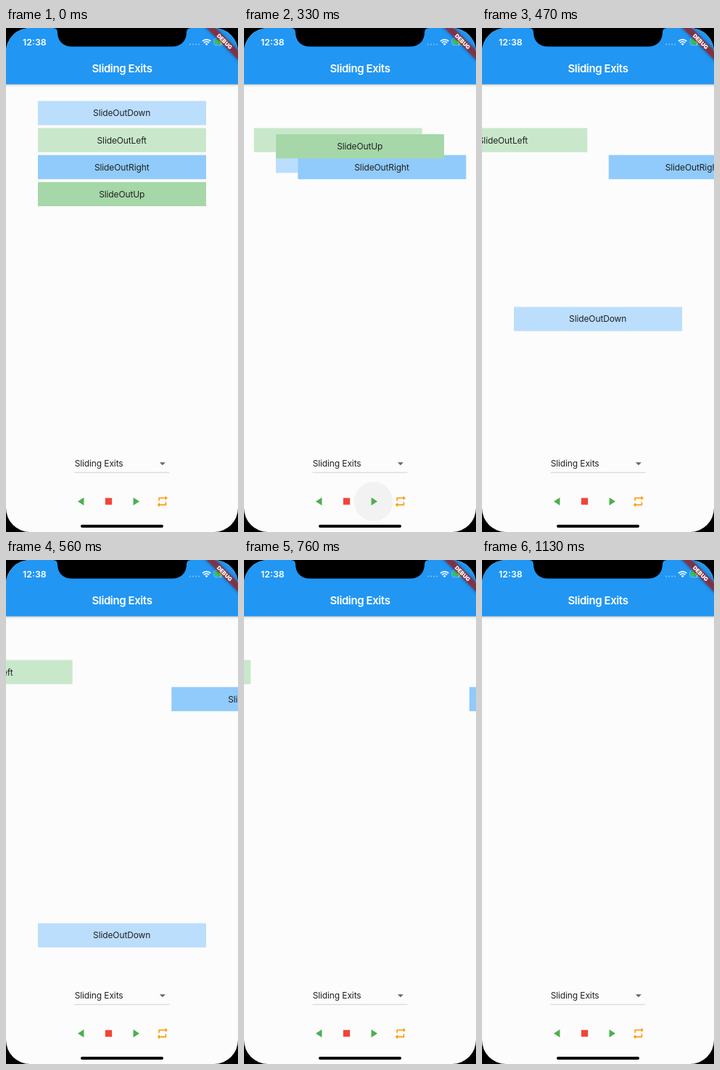
Recreate the animation shown at these times as an HTML page. Size 320 px wide and 693 px high, loop 1.18 s.

```html
<!DOCTYPE html>
<html lang="en">
<head>
<meta charset="utf-8">
<title>Sliding Exits</title>
<style>
  html, body { margin: 0; width: 100%; height: 100%; overflow: hidden; background: #000; }
  svg { display: block; width: 320px; height: 693px; }
  text { font: 12px Inter, Roboto, sans-serif; letter-spacing: -.12px; fill: #212121; }
  .title { font-size: 15px; font-weight: 600; letter-spacing: -.4px; fill: #fff; }
  .clock { font-size: 12.4px; font-weight: 600; letter-spacing: 0; fill: #fff; }
  .debug { font-size: 7.6px; font-weight: 900; letter-spacing: 0; fill: #fff; }
  .mid { text-anchor: middle; }
</style>
</head>
<body>
<svg viewBox="0 0 320 693">
  <defs>
    <clipPath id="screen"><rect width="320" height="693" rx="33"/></clipPath>
    <clipPath id="body"><rect y="77" width="320" height="503"/></clipPath>
    <linearGradient id="shade" x2="0" y2="1">
      <stop stop-opacity=".22"/>
      <stop offset=".4" stop-opacity=".07"/>
      <stop offset="1" stop-opacity="0"/>
    </linearGradient>
    <filter id="blur" x="-20%" y="-80%" width="140%" height="260%"><feGaussianBlur stdDeviation="2"/></filter>
  </defs>
  <g clip-path="url(#screen)">
    <rect width="320" height="693" fill="#fcfcfc"/>
    <g id="boxes" clip-path="url(#body)"></g>

    <rect y="77" width="320" height="5" fill="url(#shade)"/>
    <rect width="320" height="77.4" fill="#2196f3"/>
    <text class="title mid" x="160" y="61.3">Sliding Exits</text>
    <text class="clock" x="23" y="23.8">12:38</text>

    <!-- status icons -->
    <g fill="#fff">
      <path d="M254 22.5h13" stroke="#fff" stroke-opacity=".4" stroke-width="2.2" stroke-linecap="round" stroke-dasharray="0 4.1"/>
      <path d="M276.6 24l-2-2.1a2.9 2.9 0 0 1 4 0z"/>
      <path d="M270.9 18.2a8.2 8.2 0 0 1 11.4 0M273 20.4a5.2 5.2 0 0 1 7.2 0" fill="none" stroke="#fff" stroke-width="1.8"/>
      <rect x="286.8" y="14.5" width="18.5" height="9.2" rx="2.6" fill="none" stroke="#fff" stroke-opacity=".45" stroke-width=".8"/>
      <rect x="288" y="15.7" width="15" height="6.8" rx="1.5" fill="#35c759"/>
      <path d="M298 14l-4 5.6h2.6l-1 4.6 4.4-6h-2.8z"/>
    </g>

    <g transform="translate(320) rotate(45)">
      <rect x="-40" y="21.6" width="80" height="9.3" opacity=".4" filter="url(#blur)"/>
      <rect x="-40" y="21.6" width="80" height="9.3" fill="#b71c1c" fill-opacity=".63"/>
      <text class="debug mid" y="29">DEBUG</text>
    </g>
    <path d="M65 0Q71 0 71 6C71 18 79 25.5 91 25.5H229C241 25.5 249 18 249 6Q249 0 255 0Z"/>

    <!-- controls -->
    <text x="94.7" y="603.2">Sliding Exits</text>
    <path d="M94.5 611.2h131" stroke="#c8c8c8" stroke-width=".8"/>
    <path d="M211.9 597.2h8l-4 4z" fill="#666"/>
    <circle id="ripple" cx="178.6" cy="651" r="27"/>
    <g id="icons"></g>
    <rect x="103" y="683" width="114" height="4" rx="2"/>
  </g>
</svg>
<script>
const $ = id => document.getElementById(id);
const LOOP = 1180, WIDTH = 320, HEIGHT = 693, START = 223, TICK = 1000 / 60;
const TIMES = [0, 140, 190, 230, 280, 330, 370, 420, 470, 510, 560, 610, 660,
  710, 760, 810, 850, 900, 940, 990, 1040, 1080, 1130];

// name, colour, direction x, direction y
const boxes = [
  ['Down', '#bbdefd', 0, 1],
  ['Left', '#c9e8cb', -1, 0],
  ['Right', '#91cbfb', 1, 0],
  ['Up', '#a6d7a8', 0, -1]
];
$('boxes').innerHTML = boxes.map(([name, color], i) => {
  const y = 100.4 + 37.13 * i;
  return `<g><rect x="44" y="${y}" width="232" height="33.2" fill="${color}"/>
    <text class="mid" x="159.7" y="${y + 21}">SlideOut${name}</text></g>`;
}).join('');

const icons = [
  ['#4caf50', 'M16 5v14L5 12z'],
  ['#f44336', 'M6 6h12v12H6z'],
  ['#4caf50', 'M8 5v14l11-7z'],
  ['#ff9800', 'M7 7h10v3l4-4-4-4v3H5v6h2zM17 17H7v-3l-4 4 4 4v-3h12v-6h-2z']
];
$('icons').innerHTML = icons.map(([color, d], i) =>
  `<path fill="${color}" d="${d}" transform="translate(${95.1 + 37.13 * i} 641.7) scale(.773)"/>`).join('');

const clamp = v => Math.max(0, Math.min(1, v));

// cubic-bezier(.25, .1, .25, 1)
function ease(x) {
  let lo = 0, hi = 1;
  for (let i = 0; i < 24; i++) {
    const s = (lo + hi) / 2;
    if (.75 * s * (1 - s) + s ** 3 < x) lo = s; else hi = s;
  }
  return .3 * lo * (1 - lo) ** 2 + 3 * lo * lo * (1 - lo) + lo ** 3;
}

function draw(now) {
  const time = TIMES.findLast(t => t <= now % LOOP);
  const elapsed = Math.round((time - START) / TICK) * TICK;
  const p = elapsed > 0 ? ease(clamp(elapsed / 1000)) : 0;
  boxes.forEach(([, , dx, dy], i) =>
    $('boxes').children[i].setAttribute('transform', `translate(${dx * p * WIDTH} ${dy * p * HEIGHT})`));
  $('ripple').setAttribute('fill-opacity', .05 * clamp(Math.min((time - 100) / 100, (450 - time) / 160)));
}

const origin = performance.now();
function loop() {
  draw(performance.now() - origin);
  requestAnimationFrame(loop);
}
loop();
</script>
</body>
</html>
```
